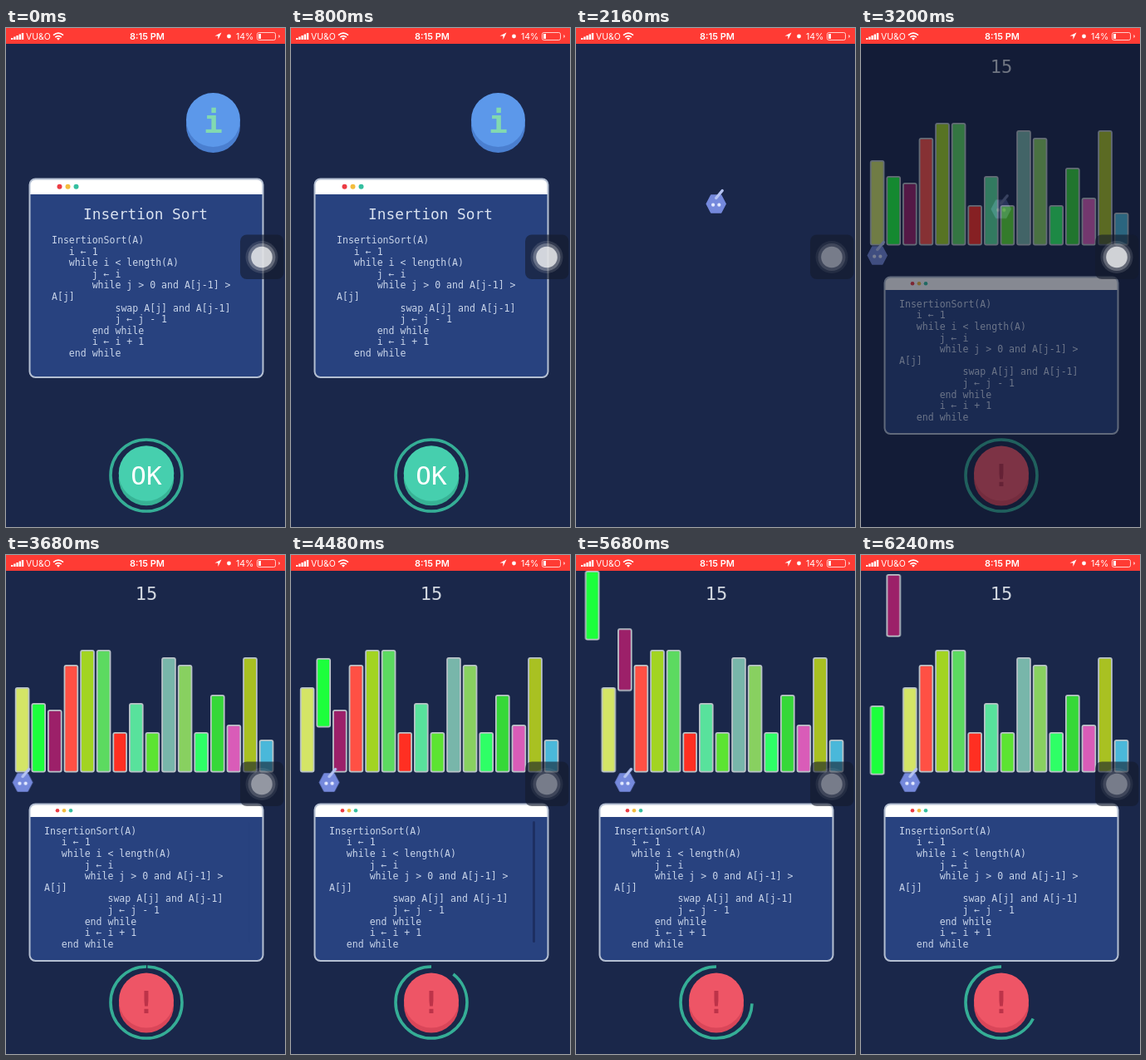
Animation of 336x600 px, one loop 6320 ms. Source, as an HTML page:

```html
<!DOCTYPE html>
<html lang="en">
<head>
<meta charset="utf-8">
<title>Insertion sort game</title>
<style>
html, body { margin: 0; width: 100%; height: 100%; overflow: hidden; background: #000; }
svg { display: block; width: 336px; height: 600px; }
text { white-space: pre; }
.mono { font-family: "DejaVu Sans Mono", "Liberation Mono", monospace; }
.ui { font-family: Inter, Roboto, sans-serif; fill: #fff; }
.mid { text-anchor: middle; }
.code { font-size: 11.55px; fill: #c9d5ea; }

.run { animation: 6320ms linear infinite both; }
.ease { animation-timing-function: cubic-bezier(.455,.03,.515,.955); }
#back { animation-name: back; }
#modal { animation-name: modal; }
#loader { animation-name: loader; }
#bounce { animation-name: bounce; animation-timing-function: cubic-bezier(.37,0,.63,1); }
#game { animation-name: game; }
#walker { animation-name: walk; }
#timer { animation-name: timer; }
#scroll { animation-name: scroll; }
#assist { animation-name: assist; }
#bar0 { animation-name: shift; }
#bar1 { animation-name: first; }
#bar2 { animation-name: second; }

@keyframes modal { 0%, 16.456% { opacity: 1 } 24.051%, 100% { opacity: 0 } }
@keyframes loader { 0%, 16.456% { opacity: 0 } 24.051%, 100% { opacity: 1 } }
@keyframes back { 0%, 46.835% { opacity: 1 } 54.43%, 100% { opacity: 0 } }
@keyframes game { 0%, 46.835% { opacity: 0 } 54.43%, 100% { opacity: 1 } }
@keyframes bounce {
  0%, 18.987%, 34.177%, 49.367%, 100% { transform: translateY(0) }
  26.582%, 41.772%, 56.962% { transform: translateY(92px) }
}
@keyframes walk {
  0%, 57.595% { transform: translateX(0) }
  65.506%, 67.722% { transform: translateX(19.6px) }
  75.633%, 100% { transform: translateX(39.2px) }
}
@keyframes timer { 0%, 57.595% { stroke-dashoffset: 0 } 100% { stroke-dashoffset: -120.6 } }
@keyframes scroll {
  0%, 58.228% { opacity: 0 }
  61%, 72.8% { opacity: 1 }
  76.6%, 100% { opacity: 0 }
}
@keyframes assist {
  0%, 23.5% { opacity: 1 }
  29.5%, 42% { opacity: .52 }
  46%, 54.4% { opacity: 1 }
  60%, 100% { opacity: .52 }
}
@keyframes first {
  0%, 67.722% { transform: translate(0, 0) }
  75.633%, 82.911% { transform: translate(0, -159px) }
  87.975%, 90.506% { transform: translate(-19.6px, -159px) }
  98.101%, 99% { transform: translate(-19.6px, 3px) }
  100% { transform: translate(-19.6px, 2px) }
}
@keyframes shift {
  0%, 82.911% { transform: translateX(0) }
  87.975%, 93.038% { transform: translateX(19.6px) }
  98.101%, 100% { transform: translateX(39.2px) }
}
@keyframes second {
  0%, 86.076% { transform: translate(0, 0) }
  93.038% { transform: translate(0, -163px) }
  98.101%, 100% { transform: translate(-19.6px, -163px) }
}
</style>
</head>
<body>
<svg viewBox="0 0 336 600">
  <defs>
    <g id="bot">
      <path d="M-6-10.5H6L11.5 0 6 10.5H-6L-11.5 0Z" fill="#7589dc" stroke="#7589dc" stroke-width="1.5" stroke-linejoin="round"/>
      <path d="M0-7 7.5-16" stroke="#b5c3f3" stroke-width="3.4" stroke-linecap="round"/>
      <circle cx="-3.6" cy="1.2" r="2.1" fill="#e3e9ff"/>
      <circle cx="3.6" cy="1.2" r="2.1" fill="#e3e9ff"/>
    </g>
  </defs>

  <g id="back" class="run">
    <rect width="336" height="600" fill="#1a274a"/>
    <g id="loader" class="run"><g id="bounce" class="run"><use href="#bot" x="168.7" y="211.5"/></g></g>
  </g>

  <g id="modal" class="run">
    <g id="intro"></g>
    <text class="mono mid" x="168" y="230" font-size="17.8" fill="#d9e2f0">Insertion Sort</text>
    <circle cx="249.5" cy="117.5" r="32.5" fill="#4a7fd0"/>
    <circle cx="249.5" cy="110.5" r="32.5" fill="#5c98ea"/>
    <text class="mono mid" x="249.5" y="126" font-size="38" font-weight="bold" fill="#82d9b0">i</text>
    <circle cx="169" cy="538" r="43" fill="none" stroke="#35ae96" stroke-width="3.6"/>
    <circle cx="169" cy="541" r="33.3" fill="#37b295"/>
    <circle cx="169" cy="535.5" r="33.3" fill="#46cfae"/>
    <text class="mono mid" x="169" y="548.5" font-size="31" fill="#fff">OK</text>
  </g>

  <g id="game" class="run">
    <rect width="336" height="600" fill="#1a274a"/>
    <text class="mono mid" x="169" y="53.5" font-size="22" fill="#d3d8e0">15</text>
    <g id="bars"></g>
    <g id="walker" class="run ease"><use href="#bot" x="19.7" y="273.5"/></g>
    <g id="panel"></g>
    <rect id="scroll" class="run" x="291" y="320" width="3" height="146" rx="1.5" fill="#1d2f62"/>
    <circle id="timer" class="run" cx="169" cy="538" r="43" fill="none" stroke="#35ae96" stroke-width="3.6"
      pathLength="360" stroke-dasharray="360 360" transform="rotate(-90 169 538)"/>
    <circle cx="169" cy="541.5" r="33" fill="#d94659"/>
    <circle cx="169" cy="535.5" r="33" fill="#ee5566"/>
    <text class="mono mid" x="169" y="550.5" font-size="38" font-weight="bold" fill="#bd3349">!</text>
  </g>

  <rect x="282" y="248.5" width="52.5" height="53.5" rx="8" fill="#151b2c" fill-opacity=".6"/>
  <g id="assist" class="run" fill="#fff">
    <circle cx="308" cy="275.5" r="19.5" opacity=".12"/>
    <circle cx="308" cy="275.5" r="16.5" opacity=".25"/>
    <circle cx="308" cy="275.5" r="12.8" opacity=".7"/>
  </g>

  <g id="status">
    <rect width="336" height="19" fill="#ff3b34"/>
    <path d="M6 12h2.4v2H6zM9.2 10.5h2.4V14H9.2zM12.4 9h2.4v5h-2.4zM15.6 7.5H18V14h-2.4zM18.8 6h2.4v8h-2.4z" fill="#fff"/>
    <text class="ui" x="24" y="14" font-size="10.5">VU&amp;O</text>
    <g fill="none" stroke="#fff" stroke-width="1.7">
      <path d="M57 8.6Q63 3.6 69 8.6M59.3 11.2Q63 8 66.7 11.2"/>
    </g>
    <path d="M61 12.6Q63 11 65 12.6L63 14.8Z" fill="#fff"/>
    <text class="ui mid" x="170" y="14" font-size="11" font-weight="600">8:15 PM</text>
    <path d="M259.5 5.5 251.5 9.6H255.4V14Z" fill="#fff"/>
    <circle cx="268.5" cy="10" r="2.4" fill="#fff"/>
    <text class="ui" x="277" y="14" font-size="10.5">14%</text>
    <rect x="302.5" y="5.5" width="22" height="9" rx="2" fill="none" stroke="#fff" stroke-opacity=".75"/>
    <rect x="304" y="7" width="3" height="6" fill="#fff"/>
    <path d="M328.5 8v4q2.5-2 0-4Z" fill="#fff"/>
  </g>
</svg>
<script>
const $ = id => document.getElementById(id);

const lines = [
  "InsertionSort(A)", "   i ← 1", "   while i < length(A)", "       j ← i",
  "       while j > 0 and A[j-1] >", "A[j]", "           swap A[j] and A[j-1]",
  "           j ← j - 1", "       end while", "       i ← i + 1", "   end while"
];

function windowSvg(top, bottom, head, dots, codeX, codeY) {
  const [dotX, gap, r] = dots;
  const lights = ["#ec3b43", "#f3bd3e", "#35bfa0"].map((c, i) =>
    `<circle cx="${dotX + gap * i}" cy="${top + head / 2}" r="${r}" fill="${c}"/>`).join("");
  const code = lines.map((s, i) =>
    `<text class="mono code" x="${codeX}" y="${codeY + 13.6 * i}">${s.replace("<", "&lt;")}</text>`).join("");
  return `<rect x="28.5" y="${top}" width="281" height="${bottom - top}" rx="7" fill="#28427f"/>
    <path d="M28.5 ${top + head}V${top + 7}q0-7 7-7h267q7 0 7 7V${top + head}Z" fill="#fff"/>
    <rect x="28.5" y="${top}" width="281" height="${bottom - top}" rx="7" fill="none" stroke="#b4bfd2" stroke-width="2"/>
    ${lights}${code}`;
}

$("intro").innerHTML = windowSvg(181.5, 420, 18.5, [64.5, 10, 3], 55, 259);
$("panel").innerHTML = windowSvg(299.5, 488, 15.5, [62, 8, 2.3], 46, 335.8);

const tops = [159, 178, 186, 132, 114, 114, 213, 178, 213, 123, 132, 213, 168, 204, 123, 222];
const fills = ["#d4e566", "#1cff3c", "#9c2069", "#ff5044", "#a2d422", "#5cda60", "#ff2f22", "#58e29c",
  "#5ce432", "#78b6aa", "#88d060", "#2eff66", "#36d838", "#d95cb8", "#a9c122", "#4ab8da"];
$("bars").innerHTML = tops.map((y, i) =>
  `<rect id="bar${i}" ${i < 3 ? 'class="run ease"' : ""} x="${11.7 + 19.6 * i}" y="${y + .8}" width="15.8"
    height="${259.8 - y}" rx="2" fill="${fills[i]}" stroke="#b9c3c8" stroke-width="1.8"/>`).join("");
</script>
</body>
</html>
```
